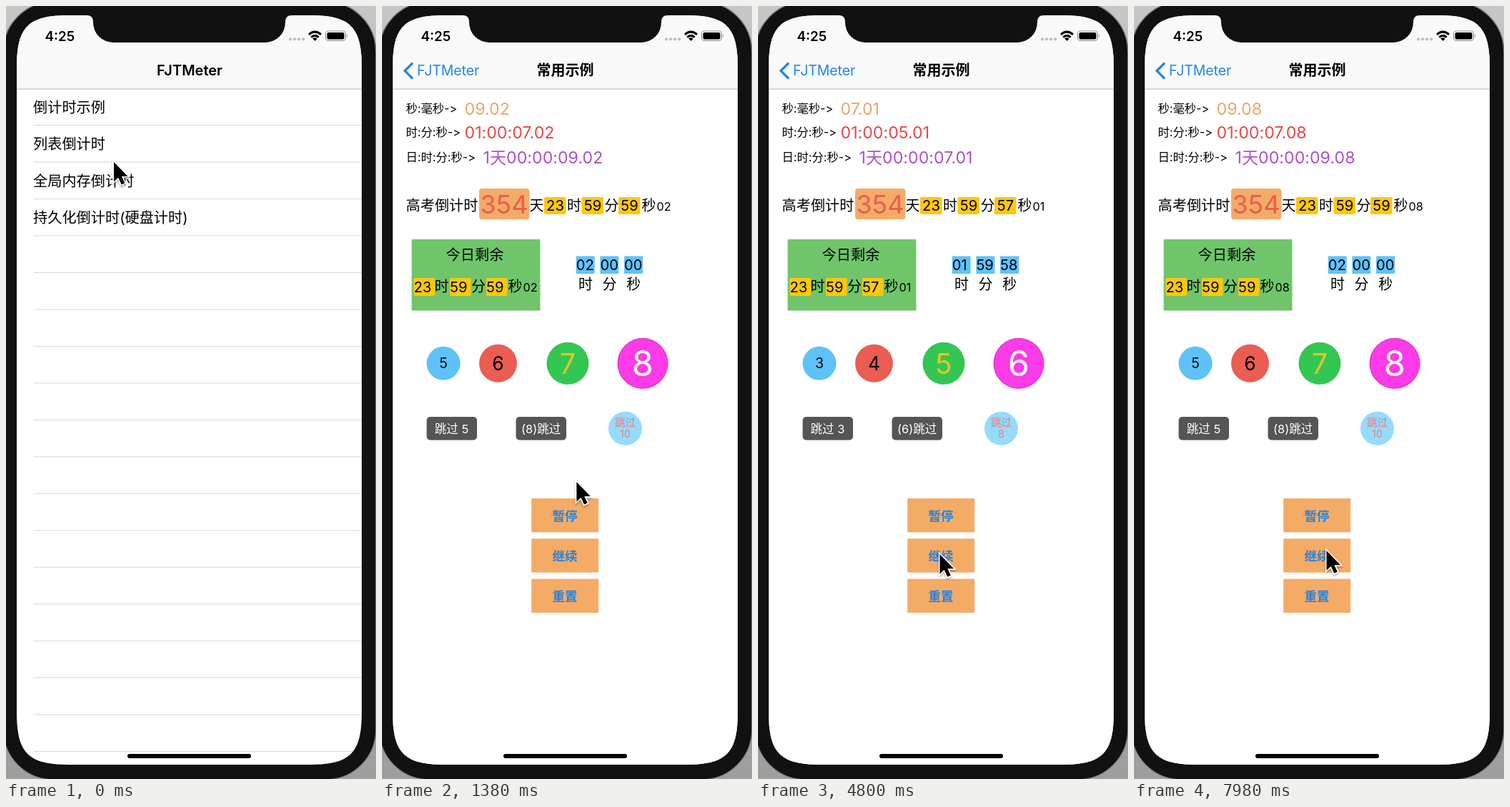
Write an HTML page that moves like this. It is 518x1080 px and loops after 8 s.

```html
<!DOCTYPE html>
<html lang="zh-CN">
<head>
<meta charset="utf-8">
<title>Countdown demo</title>
<style>
html, body { margin: 0; width: 100%; height: 100%; overflow: hidden; background: #c4c4c4; }
svg { display: block; width: 100%; height: 100%; }
text { font-family: Inter, 'Noto Sans CJK SC', sans-serif; font-variant-ligatures: none; white-space: pre; }
.bold { font-weight: 600; }
#clock { font-variant-ligatures: normal; }
</style>
</head>
<body>
<svg id="stage" viewBox="0 0 518 1080">
  <defs>
    <clipPath id="screen">
      <path d="M15 86C15 29 31 13 88 13H425C482 13 498 29 498 86V987C498 1044 482 1060 425 1060H88C31 1060 15 1044 15 987Z"/>
    </clipPath>
    <linearGradient id="desk" x2="0" y2="1">
      <stop offset="0" stop-color="#c6c6c6"/><stop offset="1" stop-color="#9e9e9e"/>
    </linearGradient>
    <filter id="soft" x="-50%" y="-50%" width="200%" height="200%">
      <feDropShadow dx="0" dy="2" stdDeviation="1.5" flood-opacity=".35"/>
    </filter>
  </defs>
  <rect width="518" height="1080" fill="url(#desk)"/>
  <rect x="-4" y="-6" width="522" height="1087" rx="70" fill="#111" stroke="#858585" stroke-width="1.5"/>
  <g clip-path="url(#screen)">
    <rect x="15" y="13" width="483" height="1047" fill="#fff"/>
    <g id="list"></g>
    <rect id="dim" x="15" y="116" width="483" height="944"/>
    <g id="page"><rect x="15" y="116" width="483" height="944" fill="#fff"/></g>
    <rect x="15" y="13" width="483" height="103" fill="#f9f9f9"/>
    <path d="M15 116H498" stroke="#b4b4b6"/>
    <text id="home" class="bold" x="257" y="97" font-size="20" text-anchor="middle">FJTMeter</text>
    <g id="back" fill="#1f86ea">
      <path d="M43 79.5L32 90.5L43 101.5" fill="none" stroke="#1f86ea" stroke-width="3.2"/>
      <text id="backText" x="49" y="97" font-size="19.4">FJTMeter</text>
    </g>
    <text id="title" x="256.5" y="97.3" font-size="20" font-weight="700" text-anchor="middle">常用示例</text>
    <text id="clock" class="bold" x="54.5" y="48.7" font-size="18.8">4:25</text>
    <g fill="#bdbdbd">
      <circle cx="398" cy="46.3" r="2.1"/><circle cx="404" cy="46.3" r="2.1"/>
      <circle cx="410" cy="46.3" r="2.1"/><circle cx="416" cy="46.3" r="2.1"/>
    </g>
    <g fill="none" stroke="#000" stroke-width="3">
      <path d="M424 39.8Q432.5 32.4 441 39.8"/><path d="M427.3 43.6Q432.5 39.2 437.7 43.6"/>
    </g>
    <path d="M432.5 48.8L429.3 45.7Q432.5 43 435.7 45.7Z"/>
    <rect x="447.5" y="35" width="28" height="13.4" rx="3.8" fill="none" stroke="#9a9a9a" stroke-width="1.2"/>
    <rect x="449.5" y="37" width="24" height="9.4" rx="2"/>
    <path d="M477 39.3Q479.4 41.7 477 44.1Z" fill="#9a9a9a"/>
    <path d="M113 12V13Q122 13 122 22V23A28 28 0 0 0 150 51H363A28 28 0 0 0 391 23V22Q391 13 400 13V12Z" fill="#111"/>
    <rect x="170" y="1045" width="173" height="6" rx="3"/>
  </g>
  <g id="cursor" filter="url(#soft)">
    <path d="M.5 1V28.5L6.7 22.8L11.2 32.5L15.8 30.4L11.4 21H20Z" stroke="#fff" stroke-width="3" paint-order="stroke"/>
  </g>
</svg>
<script>
const $ = id => document.getElementById(id);
const list = $('list'), page = $('page');

function add(parent, tag, attrs) {
  const el = document.createElementNS('http://www.w3.org/2000/svg', tag);
  for (const k in attrs) el.setAttribute(k, attrs[k]);
  parent.appendChild(el);
  return el;
}
function label(parent, str, x, y, size, fill = '#000', anchor = 'start', weight = 400) {
  const el = add(parent, 'text', { x, y, 'font-size': size, fill, 'text-anchor': anchor, 'font-weight': weight });
  el.textContent = str;
  return el;
}
const box = (x, y, width, height, fill, rx = 0) => add(page, 'rect', { x, y, width, height, fill, rx });
const disc = (cx, cy, r, fill) => add(page, 'circle', { cx, cy, r, fill });
const put = (...args) => label(page, ...args);

// Menu list
const ROW = 51.46;
const picked = add(list, 'rect', { x: 15, y: 116, width: 483, height: ROW - 1, fill: '#d1d1d5' });
['倒计时示例', '列表倒计时', '全局内存倒计时', '持久化倒计时(硬盘计时)']
  .forEach((s, i) => label(list, s, 38, 149 + i * ROW, 20.2));
for (let i = 1; i <= 18; i++)
  add(list, 'path', { d: `M38.5 ${115.2 + i * ROW}H498`, stroke: '#d6d6d8' });

// Example page; live entries are [element, formatter]
const live = [];
const bind = (el, fmt) => live.push([el, fmt]);
const two = n => String(n).padStart(2, '0');

[['秒:毫秒->', 149], ['时:分:秒->', 182], ['日:时:分:秒->', 217]]
  .forEach(([s, y]) => put(s, 33.5, y, 16.3));
bind(put('', 115.5, 151.7, 23.2, '#eba56c'), (s, c) => `${two(s)}.${c}`);
bind(put('', 115.5, 184.5, 23.2, '#e8474b'), (s, c) => `01:00:${two(s - 2)}.${c}`);
bind(put('', 141.5, 219.5, 23.2, '#ac50cf'), (s, c) => `1天00:00:${two(s)}.${c}`);

const YELLOW = '#fdc70c', BLUE = '#5ec2f9', DIGITS = 20.2;
put('高考倒计时', 33.5, 285.5, 20.2);
box(136, 255, 70.5, 43, '#f3ac68', 4);
put('354', 171, 290, 36, '#eb5c50', 'middle');
put('天', 206.5, 285.8, 20);
[[227, '时', 259], [279.5, '分', 311.5], [331, '秒', 363.5]].forEach(([x, unit, ux], i) => {
  box(x, 267, 30.5, 24, YELLOW, 2);
  const num = put(['23', '59', ''][i], x + 15.5, 286.2, DIGITS, '#000', 'middle');
  if (i == 2) bind(num, s => 50 + s);
  put(unit, ux, 285.8, 20);
});
bind(put('', 384.5, 285.5, 16.3), (s, c) => c);

box(41.5, 326, 180, 99.5, '#70c56b');
put('今日剩余', 130, 355, 20.2, '#000', 'middle');
[[44.5, '时', 73.5], [95, '分', 125], [146, '秒', 176.5]].forEach(([x, unit, ux], i) => {
  box(x, 380, 29.5, 25, YELLOW, 1);
  const num = put(['23', '59', ''][i], x, 399.7, DIGITS);
  if (i == 2) bind(num, s => 50 + s);
  put(unit, ux, 399.3, 20);
});
bind(put('', 197.5, 399.2, 16.3), (s, c) => c);

const left = s => 7191 + s;
[['时', s => left(s) / 3600], ['分', s => left(s) / 60 % 60], ['秒', s => left(s) % 60]].forEach(([unit, f], i) => {
  const x = 271.7 + i * 33.7;
  box(x, 349.5, 26, 24.5, BLUE);
  bind(put('', x, 369.2, DIGITS), s => two(Math.floor(f(s))));
  put(unit, x + 13.2, 396.3, 20, '#000', 'middle');
});

[[86, 23.5, BLUE, 19.5, '#000', 506], [162.5, 26.5, '#ea5d52', 26.5, '#000', 509.3],
 [260, 29.5, '#34c653', 39.5, '#e3c61f', 513.8], [365, 35, '#fb3be6', 49, '#fff', 517.3]]
  .forEach(([x, r, fill, size, ink, y], i) => {
    const c = disc(x, 499.3, r, fill);
    if (i == 3) c.setAttribute('stroke', '#d22fc2');
    bind(put('', x, y, size, ink, 'middle'), s => s - 4 + i);
  });

box(62.5, 574, 70.5, 32.5, '#535654', 5);
bind(put('', 97.5, 596.5, 16.5, '#fff', 'middle'), s => `跳过 ${s - 4}`);
box(187.5, 574, 70.5, 32.5, '#535654', 5);
bind(put('', 222.7, 596.5, 16.5, '#fff', 'middle'), s => `(${s - 1})跳过`);
disc(340.5, 590.3, 23.5, '#97dafc');
put('跳过', 340.5, 587.3, 14.6, '#e5807f', 'middle');
bind(put('', 340.5, 603, 14, '#e5807f', 'middle'), s => s + 1);

['暂停', '继续', '重置'].forEach((s, i) => {
  box(209.2, 688 + i * 56.2, 94, 47.3, '#f4ab66');
  put(s, 256, 718.5 + i * 56.2, 17.6, '#2483e0', 'middle', 700);
});

// Pointer stops: time, x, y
const path = [
  [0, 150.5, 217], [100, 151, 210], [320, 160, 150], [480, 163, 148], [840, 282, 458.5],
  [1560, 270, 702], [2160, 271, 708], [2600, 271, 708], [3240, 267, 757], [3780, 265, 758],
  [4250, 264, 760], [4800, 254, 765], [6120, 253, 777], [6780, 257, 816], [7620, 258, 816],
  [7980, 269, 760]
];
function pointer(t) {
  let i = 1;
  while (i < path.length - 1 && t > path[i][0]) i++;
  const [t0, x0, y0] = path[i - 1], [t1, x1, y1] = path[i];
  const u = Math.min(1, (t - t0) / (t1 - t0)), e = u * u * (3 - 2 * u);
  return [x0 + (x1 - x0) * e, y0 + (y1 - y0) * e];
}

// Hundredths left: runs, pauses at 7.73, resumes, resets
const RATE = 147 / 1320, FULL = 999;
function remaining(t) {
  if (t > 7150) return Math.min(FULL, 908 - (t - 7980) * RATE);
  if (t > 3780) return Math.min(773, 701 - (t - 4800) * RATE);
  return Math.min(FULL, Math.max(773, 962 - (t - 840) * RATE));
}

const PUSH = 499;
function draw(t) {
  const x = Math.max(0, t - PUSH) * .0194;
  const p = t > 1200 ? 1 : 1 - (1 + x) * Math.exp(-x), q = 1 - p;
  list.setAttribute('transform', `translate(${-145 * p})`);
  page.setAttribute('transform', `translate(${483 * q})`);
  $('dim').setAttribute('opacity', .1 * p);
  picked.setAttribute('opacity', t >= 420 ? 1 : 0);
  $('home').setAttribute('transform', `translate(${-165 * p})`);
  $('home').setAttribute('opacity', Math.max(0, 1 - 2 * p));
  $('back').setAttribute('opacity', p);
  $('backText').setAttribute('transform', `translate(${165 * q})`);
  $('title').setAttribute('transform', `translate(${240 * q})`);
  $('title').setAttribute('opacity', p);

  const n = Math.round(remaining(t)), s = Math.floor(n / 100), c = two(n % 100);
  for (const [el, fmt] of live) el.textContent = fmt(s, c);
  $('cursor').setAttribute('transform', `translate(${pointer(t)})`);
}

const start = performance.now();
function tick(now) {
  const t = Math.max(0, now - start) % 8000;
  draw(Math.floor(t / 60) * 60);
  requestAnimationFrame(tick);
}
draw(0);
requestAnimationFrame(tick);
</script>
</body>
</html>
```
